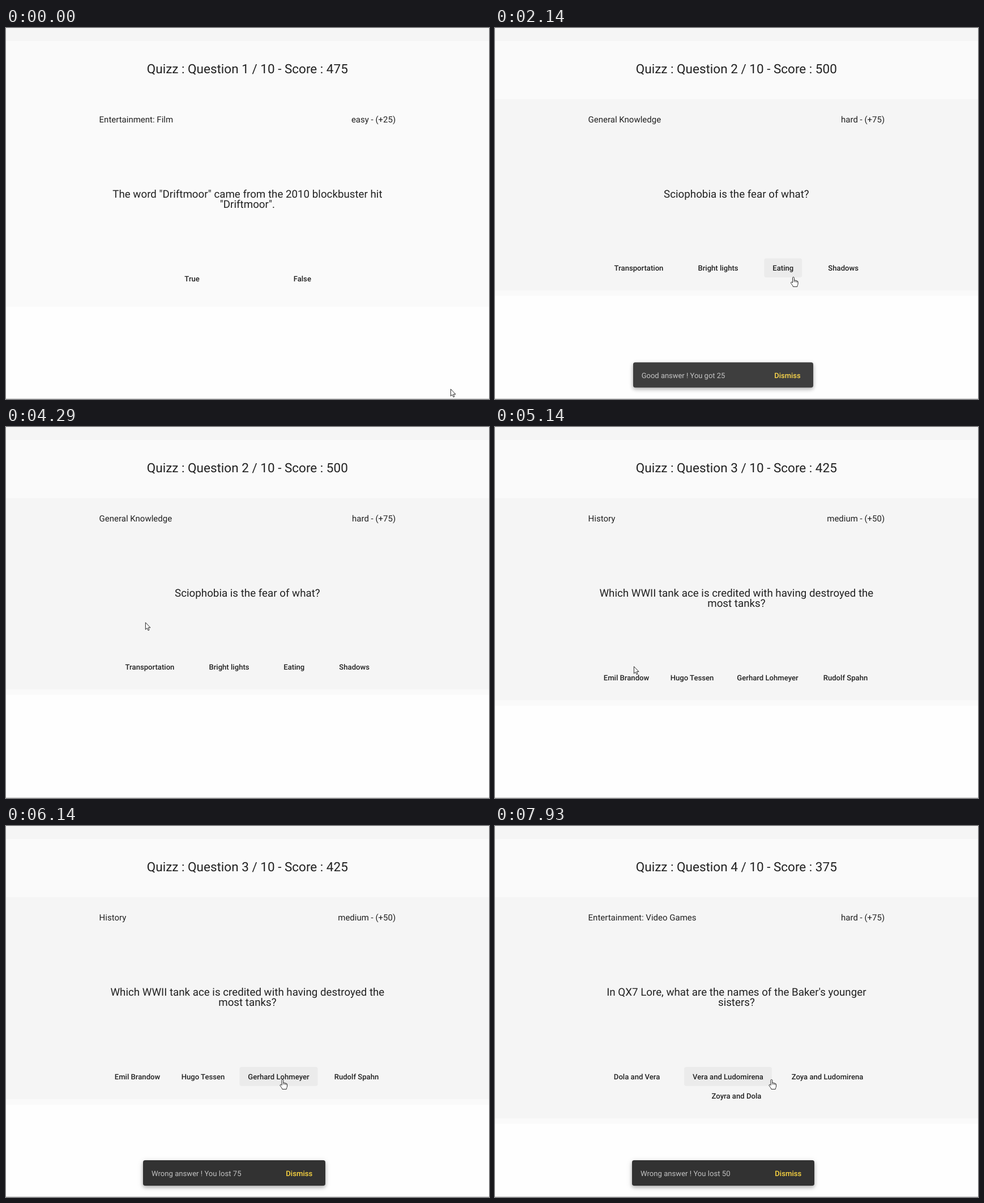
An HTML page that plays this animation: 853x656 px, repeating every 8000 ms.

```html
<!DOCTYPE html>
<html lang="en">
<head>
<meta charset="utf-8">
<title>Quizz</title>
<style>
  html, body { margin: 0; width: 100%; height: 100%; overflow: hidden; background: #fefefe; }
  svg { display: block; width: 853px; height: 656px; }
  text { font: 400 15px Roboto, sans-serif; fill: #212121; text-rendering: geometricPrecision; white-space: pre; }
  .mid { text-anchor: middle; }
  .end { text-anchor: end; }
  .title { font-size: 22.5px; }
  .ask { font-size: 18.75px; }
  .answer { font-size: 13.125px; font-weight: 500; }
  .note { font-size: 13.125px; fill: rgba(255, 255, 255, .7); }
  .dismiss { font-size: 13.125px; font-weight: 500; fill: #ffd740; }
  #snack { transform-origin: 403px 613.5px; }
  #bar { filter: drop-shadow(0 3px 3px rgba(0, 0, 0, .22)) drop-shadow(0 2px 5px rgba(0, 0, 0, .16)); }
  .pointer path { fill: #fff; stroke: #111; stroke-width: .9; stroke-linejoin: round; }
  .pointer .lines { fill: none; }
</style>
</head>
<body>
<svg viewBox="0 0 853 656">
  <rect width="853" height="656" fill="#fefefe"/>
  <rect id="page" width="853" fill="#fafafa"/>
  <rect width="853" height="23" fill="#f5f5f5"/>
  <rect id="card" y="126" width="853" fill="#f5f5f5"/>
  <rect y="655" width="853" height="1" fill="#c9c9c9"/>
  <g id="slides"></g>
  <g id="snack">
    <rect id="bar" x="242" y="591" width="322" height="45" rx="3.75" fill="#323232"/>
    <text id="note" class="note" x="257" y="618.7"></text>
    <text class="dismiss" x="494.3" y="618.7">Dismiss</text>
  </g>
  <g id="arrow" class="pointer">
    <path d="M.4.5V12.9L3.2 10.3 5.1 14.6 7 13.8 5.2 9.6H9Z"/>
  </g>
  <g id="hand" class="pointer">
    <path d="M-1.5 10.5V1.7C-1.5 0 1.3 0 1.3 1.7V6.2C2 5.6 3.8 5.8 4 6.8 4.8 6.2 6.2 6.6 6.3 7.5 7.2 7.2 8.1 7.8 8.1 9V12C8.1 14 6.9 15 6.7 17.4H-.5C-.8 15.5-3 13.3-4.3 11.2-5.1 9.6-3.3 8.6-2.3 9.6Z"/>
    <path class="lines" d="M1.3 6.2V9.3M4 6.8V9.5M6.3 7.5V9.8"/>
  </g>
</svg>
<script>
const LOOP = 8000;
const NS = 'http://www.w3.org/2000/svg';
const $ = id => document.getElementById(id);

// answers: [label, centre x, row centre y]
const quiz = [
  { from: 0, score: 475, topic: 'Entertainment: Film', level: 'easy - (+25)', bottom: 483,
    ask: ['The word "Driftmoor" came from the 2010 blockbuster hit', '"Driftmoor".'],
    answers: [['True', 328.6, 443], ['False', 523.3, 443]] },
  { from: 1970, score: 500, topic: 'General Knowledge', level: 'hard - (+75)', bottom: 464,
    ask: ['Sciophobia is the fear of what?'],
    answers: [['Transportation', 254, 424.3], ['Bright lights', 394, 424.3], ['Eating', 508.8, 424.3], ['Shadows', 615.2, 424.3]],
    note: 'Good answer ! You got 25', show: 2050, hide: 4130 },
  { from: 5070, score: 425, topic: 'History', level: 'medium - (+50)', bottom: 483,
    ask: ['Which WWII tank ace is credited with having destroyed the', 'most tanks?'],
    answers: [['Emil Brandow', 232, 443], ['Hugo Tessen', 348, 443], ['Gerhard Lohmeyer', 481.5, 443], ['Rudolf Spahn', 619, 443]],
    note: 'Wrong answer ! You lost 75', show: 5150, hide: 7310 },
  { from: 7610, score: 375, topic: 'Entertainment: Video Games', level: 'hard - (+75)', bottom: 517,
    ask: ["In QX7 Lore, what are the names of the Baker's younger", 'sisters?'],
    answers: [['Dola and Vera', 250.6, 443], ['Vera and Ludomirena', 411.5, 443], ['Zoya and Ludomirena', 587, 443], ['Zoyra and Dola', 426.5, 477]],
    note: 'Wrong answer ! You lost 50', show: 7690, hide: 9000 }
];

// pointer stops: [time, x, y]
const path = [
  [0, 785, 638], [62, 785, 638], [75, 745, 540], [150, 650, 290], [225, 560, 175],
  [300, 400, 157], [370, 240, 157], [440, 182, 190], [515, 220, 250], [590, 258, 290],
  [735, 258, 290], [820, 320, 277], [1000, 500, 280], [1100, 537, 310], [1250, 520, 370],
  [1400, 496, 412], [1510, 491, 421], [1585, 491, 421], [1660, 515, 435], [1740, 527, 440],
  [2665, 527, 440], [2910, 521, 440], [3275, 521, 440], [3290, 517, 440], [3450, 465, 405],
  [3700, 350, 335], [3950, 275, 316], [4060, 262, 314], [4125, 262, 314], [4290, 246, 345],
  [4500, 240, 385], [4700, 242, 414], [4840, 245, 423], [5400, 245, 423], [5600, 270, 432],
  [5830, 330, 437], [5905, 330, 437], [6030, 440, 446], [6140, 488.5, 448], [8000, 488.5, 448]
];

function add(parent, tag, attrs, label) {
  const el = document.createElementNS(NS, tag);
  for (const k in attrs) el.setAttribute(k, attrs[k]);
  if (label) el.textContent = label;
  parent.appendChild(el);
  return el;
}

quiz.forEach((q, i) => {
  const g = q.el = add($('slides'), 'g', {});
  add(g, 'text', { class: 'title mid', x: 426.3, y: 79.6 }, `Quizz : Question ${i + 1} / 10 - Score : ${q.score}`);
  add(g, 'text', { x: 164.6, y: 167 }, q.topic);
  add(g, 'text', { class: 'end', x: 688.2, y: 167 }, q.level);
  q.ask.forEach((line, n) => add(g, 'text', { class: 'ask mid', x: 426.4, y: 299.6 + n * 18.75 }, line));
  q.buttons = q.answers.map(([label, x, y]) => {
    const back = add(g, 'rect', { y: y - 17, height: 33.75, rx: 3.75, fill: '#000' });
    const width = add(g, 'text', { class: 'answer mid', x, y: y + 4.6 }, label).getComputedTextLength();
    const w = Math.max(60, width + 30);
    back.setAttribute('x', x - w / 2);
    back.setAttribute('width', w);
    return { back, x, y, w };
  });
});

function pointerAt(t) {
  const i = Math.max(1, path.findIndex(p => p[0] >= t));
  const [t0, x0, y0] = path[i - 1], [t1, x1, y1] = path[i];
  const k = (t - t0) / (t1 - t0);
  return [x0 + (x1 - x0) * k, y0 + (y1 - y0) * k];
}

function drawSnack(q, t) {
  let alpha = 0, scale = 1;
  if (q.note && t >= q.show) {
    const k = Math.min(1, (t - q.show) / 150);
    const ease = 1 - (1 - k) ** 3;
    alpha = t < q.hide ? ease : t < q.hide + 70 ? .746 : 0;
    scale = .8 + .2 * ease;
  }
  $('note').textContent = q.note || '';
  $('snack').style.opacity = alpha;
  $('snack').style.transform = `scale(${scale})`;
}

function draw(t) {
  const q = quiz.findLast(s => t >= s.from);
  const [x, y] = pointerAt(t);
  quiz.forEach(s => s.el.setAttribute('display', s === q ? 'inline' : 'none'));
  $('page').setAttribute('height', q.bottom + 9.5);
  $('card').setAttribute('height', q.bottom - 126);
  $('card').setAttribute('opacity', y > 126 && y < q.bottom ? 1 : 0);

  let over = false;
  for (const b of q.buttons) {
    const hit = Math.abs(x - b.x) < b.w / 2 && Math.abs(y - b.y) < 17;
    b.back.setAttribute('opacity', hit ? .04 : 0);
    over = over || hit;
  }
  // the last slide leaves the pointer in a gap between answers
  for (const [id, on] of [['arrow', !over], ['hand', over]]) {
    $(id).setAttribute('display', on ? 'inline' : 'none');
    $(id).setAttribute('transform', `translate(${x} ${y})`);
  }
  drawSnack(q, t);
}

const start = performance.now();
function tick() {
  draw((performance.now() - start) % LOOP);
  requestAnimationFrame(tick);
}
tick();
</script>
</body>
</html>
```
